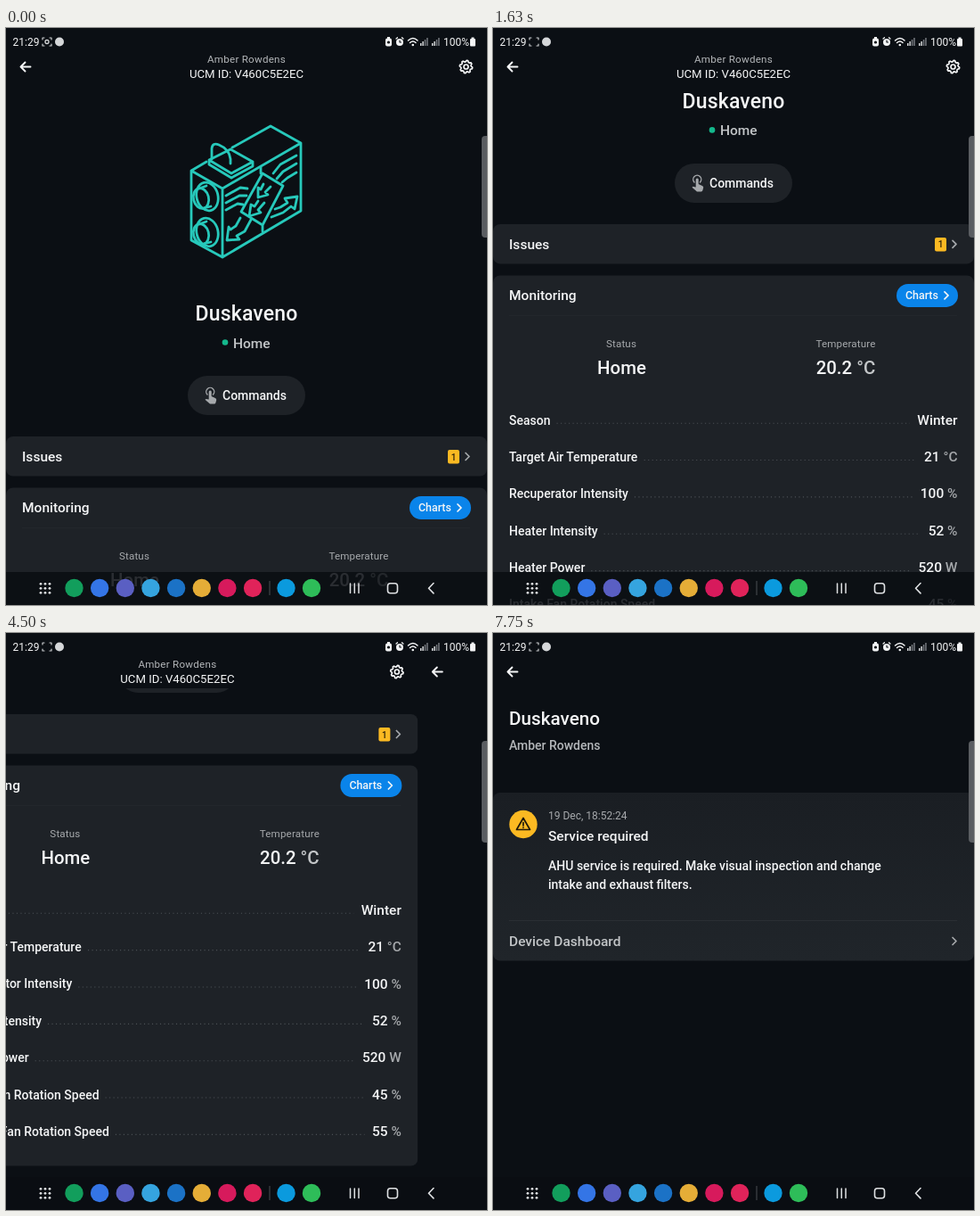
These frames come from a looping animation (540x647 px, 8000 ms). An HTML page:

```html
<!DOCTYPE html>
<html lang="en">
<head>
<meta charset="utf-8">
<title>Ventilation unit</title>
<style>
  html, body { margin: 0; width: 100%; height: 100%; overflow: hidden; background: #0b0f14; }
  svg { display: block; width: 540px; height: 647px; font-family: Roboto, sans-serif; }
  text { white-space: pre; }
  .line { fill: none; stroke-linecap: round; stroke-linejoin: round; }
</style>
</head>
<body>
<svg id="stage" viewBox="0 0 540 647"></svg>
<script>
const LOOP = 8000, W = 540;
const DEVICE = 'Duskaveno', PLACE = 'Amber Rowdens';
const BG = '#0b0f14', CARD = '#1e2227', WHITE = '#f4f5f6', GREY = '#a6a9ac', SOFT = '#c3c6c8';
const AMBER = '#fbb922', TEAL = '#27c9bb';

// Drawing helpers: y is the middle of the capitals
const text = (x, y, size, str, { fill = WHITE, weight = 500, anchor = 'start', space = 0 } = {}) =>
  `<text x="${x}" y="${y + size * 0.355}" font-size="${size}" font-weight="${weight}" fill="${fill}" text-anchor="${anchor}" letter-spacing="${space}">${str}</text>`;
const rect = (x, y, w, h, r, fill) => `<rect x="${x}" y="${y}" width="${w}" height="${h}" rx="${r}" fill="${fill}"/>`;
const dot = (x, y, r, fill) => `<circle cx="${x}" cy="${y}" r="${r}" fill="${fill}"/>`;
const line = (d, stroke = WHITE, width = 1.7) => `<path class="line" d="${d}" stroke="${stroke}" stroke-width="${width}"/>`;
const chevron = (x, y, color, width = 1.7) => line(`M${x - 2} ${y - 4}l4 4-4 4`, color, width);
const backArrow = line('M27.500 43.500H17M21.500 38.500L16.500 43.500L21.500 48.500', WHITE, 1.9);

const pen = document.createElement('canvas').getContext('2d');
function widthOf(str, size) {
  pen.font = `500 ${size}px Roboto, sans-serif`;
  return pen.measureText(str).width;
}

function gear(x, y) {
  let d = '';
  for (let i = 0; i < 32; i++) {
    const a = (i + 0.5) * Math.PI / 16, r = i % 4 < 2 ? 7.2 : 5.7;
    d += `${i ? 'L' : 'M'}${(x + r * Math.cos(a)).toFixed(2)} ${(y + r * Math.sin(a)).toFixed(2)}`;
  }
  return line(d + 'Z', WHITE, 1.7) + `<circle class="line" cx="${x}" cy="${y}" r="2.500" stroke="${WHITE}" stroke-width="1.700"/>`;
}

const warning = (x, y) => dot(x, y, 15.7, AMBER) +
  line(`M${x} ${y - 7}l7.500 13h-15zM${x} ${y - 2}v3.500M${x} ${y + 3.700}v.100`, '#20190a', 1.7);

function header(title) {
  const mid = { anchor: 'middle' };
  return backArrow + text(270, 34.5, 11.6, PLACE, { ...mid, fill: '#b4b7ba', weight: 400, space: 0.25 }) +
    text(270, 51, 13.2, title, { ...mid, weight: 400 });
}

function unitArt() {
  const port = y => `<ellipse cx="226" cy="${y}" rx="12" ry="16" transform="rotate(-14 226 ${y})"/>
    <ellipse cx="219" cy="${y + 2}" rx="8.500" ry="11.500" transform="rotate(-14 219 ${y + 2})"/>
    <path d="M217 ${y - 9}l8 -3M222 ${y + 13}l8 -2"/>`;
  return `<g id="unit" class="line" stroke="${TEAL}" stroke-width="2.800">
    <path d="M225 150L208 160V238L243 257L331 205V129L297 110L254 134M208 160L243 180L331 129M243 180V257"/>
    <path d="M228 148L252 136L277 150L253 163ZM228 148V153L253 168L277 155V150"/>
    <path d="M231 147V135Q232 128 239 131Q251 136 252 147V152"/>
    ${port(189)}${port(229)}
    <path d="M288 163L311 177L288 221L264 206ZM286 163V156M288 221V228"/>
    <path d="M247 188L263 179L271 180M247 196L262 188L270 188M247 204L260 197L266 198"/>
    <path d="M300 163L308 153L326 143M304 169L311 161L326 152M310 173L316 168L326 162"/>
    <path d="M263 213L258 222L252 226L250 223L248 238L262 237L259 233L268 228L275 215"/>
    <path d="M302 203L308 201L316 196L313 191L327 189L324 203L320 200L311 207L298 212"/>
    <path d="M283 194L279 200L275 198L273 211L286 207L283 204L290 196M289 175L286 181L283 179V190L294 187L291 184L297 178"/>
  </g>`;
}

const ROWS = [
  ['Season', 'Winter', ''], ['Target Air Temperature', '21', ' °C'], ['Recuperator Intensity', '100', ' %'],
  ['Heater Intensity', '52', ' %'], ['Heater Power', '520', ' W'],
  ['Intake Fan Rotation Speed', '45', ' %'], ['Exhaust Fan Rotation Speed', '55', ' %']
];

function row([label, value, unit], i) {
  const y = 677.3 + i * 41.35;
  const from = 18 + widthOf(label, 14) + 7, to = 521 - widthOf(value + unit, 15.5) - 8;
  return text(18, y + 0.5, 14, label) +
    `<path d="M${from} ${y + 4}H${to}" stroke="#4b5055" stroke-width="1.100" stroke-dasharray="1.100 3.400"/>` +
    text(521.5, y, 15.5, `${value}<tspan fill="${GREY}">${unit}</tspan>`, { anchor: 'end' });
}

function dashboard() {
  const mid = { anchor: 'middle' }, label = { ...mid, fill: GREY, weight: 400, space: 0.15 };
  return `<g id="dash">${header('UCM ID: V460C5E2EC')}${gear(516.5, 43.5)}
    <g clip-path="url(#body)">${unitArt()}<g id="scroll">
      ${text(270, 319.5, 23, DEVICE, { ...mid, space: 0.15 })}
      ${dot(246, 352.5, 3.3, '#14b88c')}${text(255, 353, 15.5, 'Home', { fill: SOFT })}
      ${rect(204, 390, 132, 44, 22, CARD)}
      ${line('M226 411a4.500 4.500 0 1 1 6.500 0', GREY, 1.4)}
      <path d="M227.700 408a1.500 1.500 0 0 1 3 0v5l4.300 2q1.500 .700 1.200 2.200l-.800 3q-.300 1.300-1.600 1.300h-4.800l-5.500-4.700 1-.900 3.200 .700z" fill="${GREY}"/>
      ${text(243, 412, 14, 'Commands')}
      ${rect(0, 458, W, 44.5, 8, CARD)}${text(18, 480.5, 15.5, 'Issues')}
      ${rect(496, 473, 13, 15.5, 2, AMBER)}${text(502.5, 481, 10, '1', { ...mid, fill: '#2b2108' })}
      ${chevron(518, 480.5, GREY)}
      ${rect(0, 515.5, W, 449, 8, CARD)}${text(18, 537.5, 15.5, 'Monitoring')}
      ${rect(453, 525, 69, 26, 13, '#0a84ea')}${text(463, 538, 12.4, 'Charts')}${chevron(509, 538, WHITE)}
      ${rect(18, 560, 503, 1, 0, '#23272c')}
      ${text(144, 592, 11.6, 'Status', label)}${text(396, 592, 11.6, 'Temperature', label)}
      ${text(144.5, 618.5, 20.4, 'Home', mid)}
      ${text(396, 618.5, 20.4, `20.2<tspan fill="${SOFT}"> °C</tspan>`, mid)}
      ${ROWS.map(row).join('')}
    </g></g></g>`;
}

const issues = () => `<g id="issues">${header('Issues')}<g id="list">
    ${rect(12, 62, 117.5, 37.5, 18.7, '#383d43')}${text(24, 81, 14, DEVICE)}
    ${line('M104 79l4 4 4-4', GREY, 1.6)}
    ${text(12, 119.5, 11, '19 DECEMBER', { fill: GREY, space: 1.7 })}
    ${warning(27.7, 157)}${text(56, 149.5, 14, DEVICE)}
    ${text(56, 168.5, 13, 'Service required', { fill: SOFT, weight: 400 })}
    ${text(528, 148.5, 12, '18:52', { fill: GREY, weight: 400, anchor: 'end' })}
    ${rect(12, 189, 516, 1, 0, '#24282d')}
  </g></g>`;

const detail = () => `<g id="detail">${backArrow}
    ${text(18, 96, 20.7, DEVICE)}${text(18, 126, 14, PLACE, { fill: '#b4b7ba' })}
    ${rect(0, 179, W, 188.5, 8, 'url(#panel)')}${warning(34, 214.5)}
    ${text(62, 204.5, 12, '19 Dec, 18:52:24', { fill: GREY, weight: 400 })}
    ${text(62, 227, 15.5, 'Service required')}
    ${text(62, 261.5, 14, 'AHU service is required. Make visual inspection and change')}
    ${text(62, 282.5, 14, 'intake and exhaust filters.')}
    ${rect(18, 322, 503, 1, 0, '#2a2e33')}
    ${text(18, 345.5, 15.5, 'Device Dashboard', { fill: SOFT })}${chevron(518, 345.5, GREY)}
  </g>`;

function statusBar() {
  const bars = x => [0, 1, 2, 3].map(i => rect(x + i * 2.4, 17 - i * 2, 1.5, 3 + i * 2, 0, i < 2 ? '#d5d7d9' : '#777b80')).join('');
  return text(7.5, 16, 12, '21:29', { weight: 400 }) +
    line('M41 13v-2h2M49 11h2v2M51 18v2h-2M43 20h-2v-2', '#c9cbcd', 1.2) +
    `<g id="blink"><circle cx="46" cy="15.500" r="2" fill="none" stroke="#d5d7d9" stroke-width="1.300"/></g>` +
    dot(60, 15.5, 5, '#d5d7d9') +
    rect(426, 11.5, 7, 9, 2, WHITE) + rect(428, 10, 3, 2, 0, WHITE) + dot(429.5, 16, 1.6, BG) +
    dot(442, 16, 4, WHITE) + line('M442 14v2h1.500', BG, 1.1) + line('M438 12l1.500-1.300M446 12l-1.500-1.300', WHITE, 1.2) +
    line('M451.500 14Q457 9 462 14M453.500 16.500Q457 13.500 460 16.500', WHITE, 1.5) + dot(456.8, 19, 1.3, WHITE) +
    bars(465) + bars(478) + text(491, 16, 12, '100%', { weight: 400 }) +
    rect(521, 12, 6, 8.5, 1, WHITE) + rect(522.5, 10.5, 3, 2, 0, WHITE);
}

function navBar() {
  const apps = ['#129e5c', '#3475e6', '#5a5fc3', '#35a4df', '#1b72c6', '#e5ad37', '#d71a5c', '#e0235a'];
  let out = rect(0, 610, W, 37, 0, 'rgba(10,13,18,.860)');
  for (let i = 0; i < 9; i++) out += dot(39 + i % 3 * 5, 623.3 + (i / 3 | 0) * 5, 1.4, '#dfe1e3');
  apps.forEach((c, i) => out += dot(76.5 + i * 28.65, 628, 10.2, c));
  return out + rect(295.5, 620, 1, 16, 0, '#4a4e53') + dot(314.5, 628, 10.2, '#0b9ade') + dot(343, 628, 10.2, '#2ebd59') +
    line('M386.500 623v10.500M391.300 623v10.500M396 623v10.500', '#dfe1e3', 1.5) +
    `<rect x="428.500" y="622.700" width="11" height="11" rx="3" fill="none" stroke="#dfe1e3" stroke-width="1.600"/>` +
    line('M480 622.500l-5.500 5.700 5.500 5.700', '#dfe1e3', 1.6);
}

const stage = document.getElementById('stage');
stage.innerHTML = `<defs>
    <clipPath id="body"><rect y="62" width="540" height="585"/></clipPath>
    <linearGradient id="panel" x2="0" y2="1"><stop stop-color="#1a1e23"/><stop offset="1" stop-color="#20252a"/></linearGradient>
  </defs>${rect(0, 0, W, 647, 0, BG)}${dashboard()}${issues()}${detail()}${statusBar()}${navBar()}
  <path d="M540 121h-2q-4 0-4 4v106q0 4 4 4h2z" fill="#5a5d61"/>`;

const part = Object.fromEntries(['dash', 'scroll', 'unit', 'issues', 'list', 'detail', 'blink']
  .map(id => [id, document.getElementById(id)]));
const phase = (t, start, length) => Math.min(1, Math.max(0, (t - start) / length));
const inOut = p => p < 0.5 ? 4 * p ** 3 : 1 - 4 * (1 - p) ** 3;
const move = (el, x, y = 0) => el.setAttribute('transform', `translate(${x.toFixed(2)} ${y.toFixed(2)})`);
const show = (el, on) => el.setAttribute('visibility', on ? 'inherit' : 'hidden');

function draw(t) {
  // Steady drag, then a short glide to the end of the page
  const glide = phase(t, 2000, 254);
  const scroll = 334 * phase(t, 715, 1285) + 33 * (1 - (1 - glide) ** 2);
  move(part.scroll, 0, -scroll);
  const scale = Math.max(0, 1 - scroll * 0.00455);
  part.unit.setAttribute('transform', `translate(270 ${184 - scroll * 0.7}) scale(${scale}) translate(-270 -184)`);
  show(part.unit, scale > 0);

  const first = inOut(phase(t, 4369, 400)), second = inOut(phase(t, 6480, 400));
  move(part.dash, -W * first);
  move(part.issues, W * (1 - first - second));
  move(part.detail, W * (1 - second));
  show(part.list, t >= 5380);
  show(part.blink, t % 2000 < 400);
}

const begin = performance.now();
function tick() {
  draw((performance.now() - begin) % LOOP);
  requestAnimationFrame(tick);
}
tick();
</script>
</body>
</html>
```
